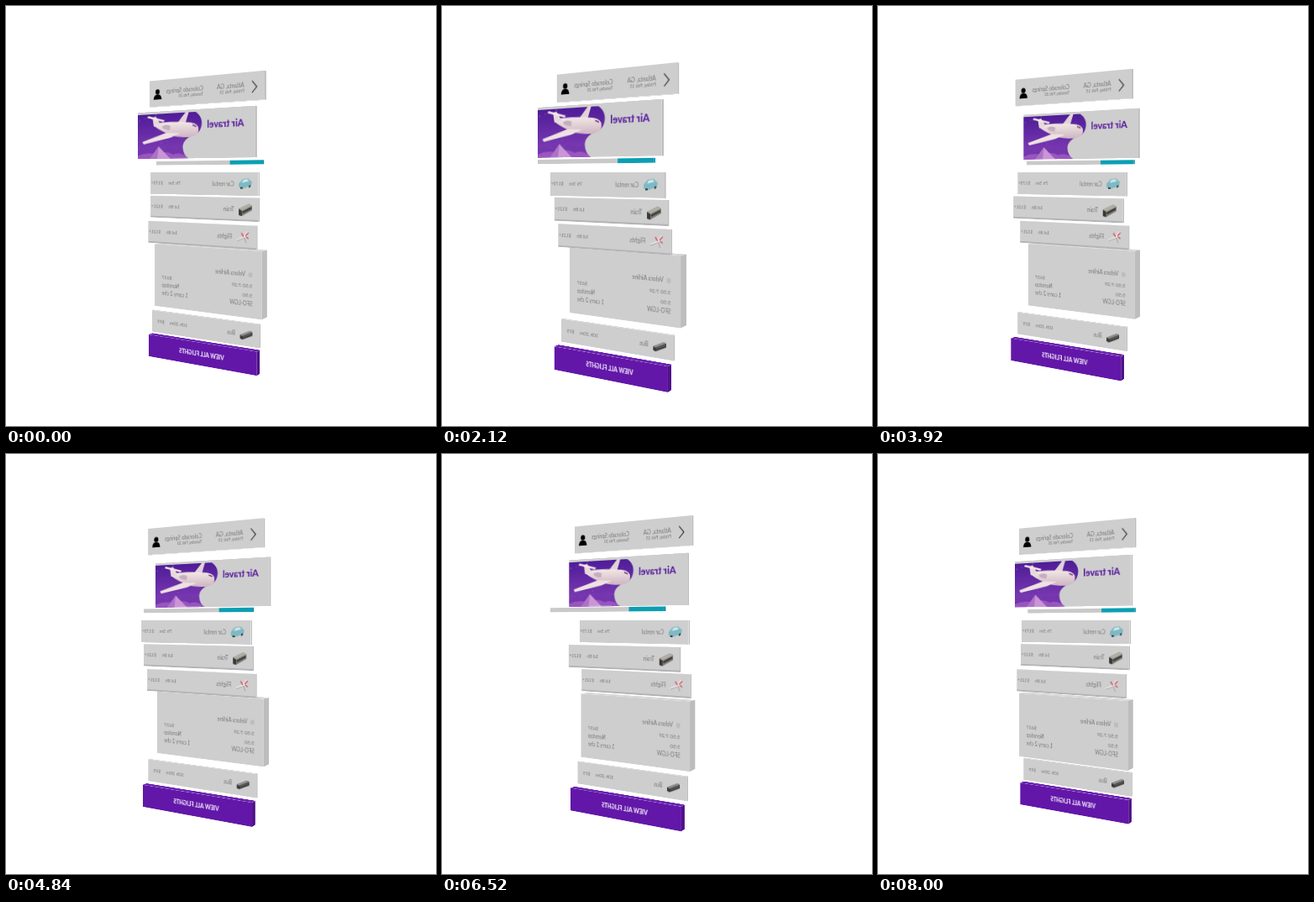
Recreate the animation shown at these times as an HTML page. Size 512 by 500 pixels, loop 8040 ms.

```html
<!DOCTYPE html>
<html lang="en">
<head>
<meta charset="utf-8">
<style>
  html, body { margin: 0; width: 100%; height: 100%; overflow: hidden; background: #fff; }
  #stage { position: absolute; width: 512px; height: 500px; overflow: hidden;
    perspective: 721px; perspective-origin: 256px 200px; }
  #scene { position: absolute; left: 240px; top: 200px; width: 0; height: 0;
    transform-style: preserve-3d; transform: rotateY(-29.3deg); }
  .slab { position: absolute; transform-style: preserve-3d; }
  .slab > * { position: absolute; left: 0; top: 0; }
  .front { transform: scaleX(-1); }
  .side { transform-origin: 0 0; transform: rotateY(90deg); }
  .edge { transform-origin: 0 0; transform: rotateX(-90deg); }
  text { font-family: Lato, "Open Sans", sans-serif; fill: #777; }
</style>
</head>
<body>
<div id="stage"><div id="scene"></div></div>
<script>
const LOOP = 8040;
const TIMES = [0, 1600, 2120, 2570, 3040, 3450, 4400, 4840, 5380, 5920, 6300, 7040, 7250, 7620, 8000];
const GRAY = ['#cecece', '#bdbdbd', '#d6d6d6'];
const PURPLE = ['#6217a8', '#4f1189', '#6c22b0'];
const scene = document.getElementById('scene');
const slabs = [];

// y is the text's vertical centre
const text = (x, y, size, str, attrs = '') =>
  `<text x="${x}" y="${y + size * 0.35}" font-size="${size}" ${attrs}>${str}</text>`;
const path = (d, fill, attrs = '') => `<path d="${d}" fill="${fill}" ${attrs}/>`;
const line = (d, stroke, width) => path(d, 'none', `stroke="${stroke}" stroke-width="${width}"`);
const END = 'text-anchor="end"';

function slab(x, y, w, h, depth, [face, side, edge], art, zs) {
  const el = document.createElement('div');
  el.className = 'slab';
  el.style.cssText = `left:${x}px;top:${y}px;width:${w}px;height:${h}px`;
  el.innerHTML =
    `<div class="edge" style="top:${y < 0 ? h : 0}px;width:${w}px;height:${depth}px;background:${edge}"></div>
     <div class="side" style="left:${w}px;width:${depth}px;height:${h}px;background:${side}"></div>
     <svg class="front" width="${w}" height="${h}" style="background:${face}">${art}</svg>`;
  scene.append(el);
  slabs.push({ el, zs });
}

function row(y, name, time, price, icon, zs, lip = false) {
  const strip = lip ? '<rect y="25" width="149" height="2" fill="#b3b3b8"/>' : '';
  slab(-79, y, 149, 26.5, 3, GRAY,
    strip + icon + text(31, 14, 6.8, name) + text(122, 13, 6.5, time, END) + text(130, 13, 6.2, price), zs);
}

const header =
  line('M16 10.5 L10 17.5 L16 24', '#222', 1.1) +
  text(26, 14.5, 7.2, 'Atlanta, GA') + text(26, 21.5, 5.3, 'Friday, Feb 15') +
  text(81, 14, 7.2, 'Colorado Springs') + text(81, 21.5, 5, 'Tuesday, Feb 20') +
  '<circle cx="147.5" cy="14.5" r="3.2"/>' +
  path('M141.5 24 Q142 18.5 145.5 18 H149.5 Q153 18.5 153.5 24Z', '#000');

let stars = '';
for (let i = 0; i < 22; i++)
  stars += `<circle cx="${78 + i * 37 % 82}" cy="${3 + i * 17 % 36}" r="${0.3 + i % 3 * 0.15}" fill="#c9a4ea"/>`;

const hero = `<defs>
    <linearGradient id="sky" x2="0" y2="1"><stop stop-color="#4c1a96"/><stop offset="1" stop-color="#8440b8"/></linearGradient>
    <linearGradient id="hull" x2="0" y2="1"><stop stop-color="#f4e9e6"/><stop offset="1" stop-color="#cdb5c2"/></linearGradient>
    <clipPath id="blob"><path d="M162 3 H77 C66 9 66 23 76 29 C90 32 97 38 94 48 Q92 54 87 57 H162Z"/></clipPath>
  </defs><g clip-path="url(#blob)">
  <rect x="60" width="102" height="57" fill="url(#sky)"/>` + stars +
  path('M80 57 Q92 38 104 46 Q114 38 122 46 Q132 40 142 47 Q152 42 162 48 V57Z', '#7436ac') +
  path('M86 57 Q98 48 108 52 Q120 46 130 52 Q146 47 162 54 V57Z', '#9a55c0') +
  path('M112 57 L129 42 L142 57Z', '#c995d6') + path('M129 42 L142 57 H131Z', '#ad72c6') + '</g>' +
  path('M104 17 L90 2 L86 2 L92 19Z', '#e2d2d8') +
  path('M73 24 Q72 17 84 15 Q106 12 133 14 L136 17 Q124 25 108 30 Q86 34 77 30 Q73 28 73 24Z', 'url(#hull)') +
  path('M126 16 L133 6 L138 7 L136 18Z', '#e6d9dc') +
  path('M120 11 L144 5 L146 7 L122 13Z', '#f3e8e6') +
  path('M98 27 L118 26 L153 36 L151 39 L112 32Z', '#efe1e2') +
  path('M112 18 Q118 15 124 18 Q124 22 113 23Z', '#c4aebf') +
  line('M76 20 L81 18', '#6d4a85', 1.4) +
  text(14, 18, 11.6, 'Air travel', 'font-weight="800" style="fill:#5a1f9e"');

const detail =
  '<rect x="12" y="25.5" width="5" height="5" fill="#bcbcbc"/>' +
  text(21, 28, 6.9, 'Velora Airline') + text(12, 41, 6.4, '5:50 7:29') +
  text(12, 52, 6.4, '5:50') + text(12, 62, 6.6, 'SFO-LGW') +
  text(138, 40.5, 6.5, '$637', END) + text(138, 50.5, 6.8, 'Nonstop', END) +
  text(138, 60.5, 6.8, '1 carry 2 che', END);

const car = path('M8 11 L13 7 L20 8 L25 13 L25 17 L20 19 L9 15Z', '#7fb9c4') +
  path('M12 10 L14 8 L19 9 L21 12Z', '#d9edf0') + line('M10 15 L12 17 M20 18 L23 18', '#35454b', 1.8);
const train = path('M8 9 L12 7 L25 13 V20 L21 21 L8 14Z', '#77756f') +
  path('M8 9 L12 7 L25 13 L21 15Z', '#b1aea4') + path('M21 15 L25 13 V20 L21 21Z', '#393939') +
  line('M9 11.5 L20 17', '#333', 1.6);
const plane = path('M10 7 L12 7 L17 13 L26 17 L25 18 L15 15Z', '#eee') +
  line('M10 8 L14 12 M13 13 L10 15 M16 13 L19 9', '#d2505c', 1.3) +
  line('M14 14 L25 18 M15 15 L13 20', '#96969c', 0.8);
const bus = path('M9 10 L12 9 L25 15 V19 L22 20 L9 14Z', '#3a3a3a') +
  path('M9 10 L12 9 L25 15 L22 16Z', '#90908d') + line('M10 12 L21 17', '#777', 0.8);

slab(-84.7, -117, 160, 33, 4, GRAY, header,
  [0, 18, 57, 115, 55, 10, 21, 3, 8, 9, 12, 55, 78, 0, 5]);
slab(-84.7, -75.5, 160, 56.5, 4, GRAY, hero,
  [24, 50, 91, 115, 63, 10, -10, -13, 12, 50, 45, 3, 0, 10, 14]);
slab(-79, -16, 149, 4.6, 3, ['#c9c9c9', '#0b8798', '#bcbcbc'], '<rect width="43" height="5" fill="#0b9fb3"/>',
  [-6, 48, 98, 90, 23, 5, -3, 20, 50, 85, 97, 13, 8, 0, -5]);
row(-2.5, 'Car rental', '7h 5m', '$173+', car,
  [6, 35, 76, 125, 79, 28, 15, 25, 50, 40, 30, -1, 0, 10, 8]);
row(26.5, 'Train', '1d 8h', '$121+', train,
  [6, 28, 69, 115, 62, 15, 40, 20, 45, 59, 50, 25, 30, 25, 10], true);
row(57.5, 'Flights', '1d 8h', '$121+', plane,
  [11, 30, 62, 80, 20, 4, 20, 13, 0, -8, 15, 13, 20, 25, 18], true);
slab(-79, 88, 149, 78, 14, GRAY, detail,
  [-3, 5, 40, 85, 33, 0, -6, -8, 10, 35, 25, 1, 0, 15, 13]);
row(169.5, 'Bus', '10h 20m', '$95', bus,
  [3, 15, 56, 110, 69, 15, 25, 11, 30, 55, 35, 3, 5, 12, 4]);
slab(-79, 198.5, 149, 27, 8, PURPLE,
  text(73, 14, 7, 'VIEW ALL FLIGHTS', 'text-anchor="middle" font-weight="900" style="fill:#e9dcf5"'),
  [10, 28, 69, 132, 64, 12, 52, 22, 43, 2, 42, 17, 35, 49, 11]);

const slope = (zs, i) => i < 1 || i > TIMES.length - 2 ? 0
  : (zs[i + 1] - zs[i - 1]) / (TIMES[i + 1] - TIMES[i - 1]);

// Smooth Hermite curve through the depth keys
function depthAt(zs, t) {
  const last = TIMES.length - 1;
  if (t >= TIMES[last]) return zs[last];
  const i = TIMES.findIndex(k => k > t) - 1;
  const span = TIMES[i + 1] - TIMES[i], p = (t - TIMES[i]) / span, q = 1 - p;
  return zs[i] * q * q * (1 + 2 * p) + zs[i + 1] * p * p * (3 - 2 * p) +
    span * p * q * (slope(zs, i) * q - slope(zs, i + 1) * p);
}

const start = performance.now();
function draw() {
  const t = (performance.now() - start) % LOOP;
  for (const { el, zs } of slabs) el.style.transform = `translateZ(${depthAt(zs, t)}px)`;
  requestAnimationFrame(draw);
}
draw();
</script>
</body>
</html>
```
